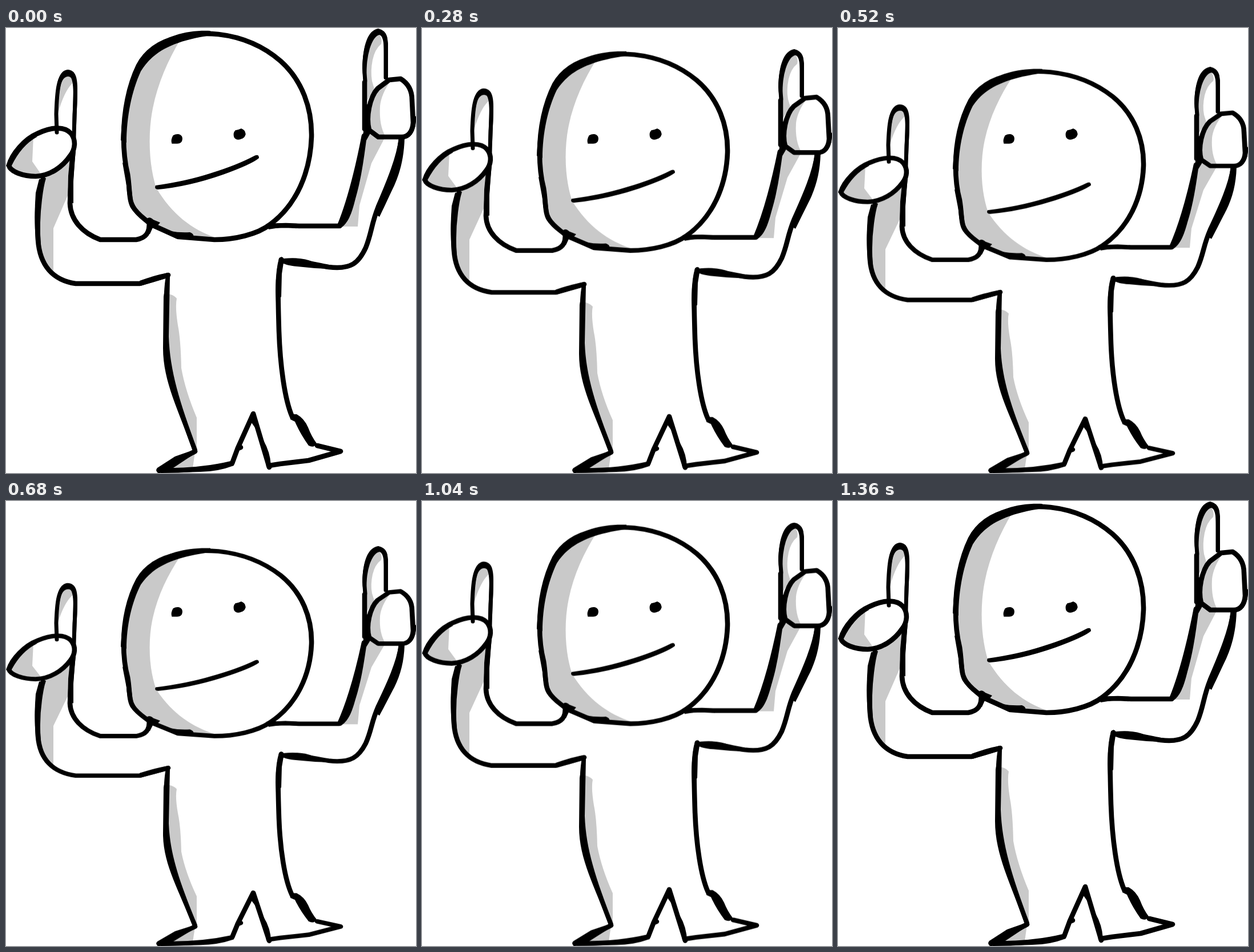
Animation of 718x780 px, one loop 1400 ms. Source, as an HTML page:

```html
<!DOCTYPE html>
<html lang="en">
<head>
<meta charset="utf-8">
<title>Squash bounce</title>
<style>
  html, body { margin: 0; width: 100%; height: 100%; overflow: hidden; background: #fff; }
  svg { display: block; width: 718px; height: 780px; }
  #figure { transform-origin: 0 780px; translate: 0 1px; }
  .shade { fill: #c9c9c9; }
  .line { fill: none; stroke: #000; stroke-width: 8.6; stroke-linecap: round; stroke-linejoin: round; }
  .thin { stroke-width: 7; }
  .paper { fill: #fff; }
  .eyes { stroke: #000; stroke-width: 1.5; }
</style>
</head>
<body>
<svg viewBox="0 0 718 780">
  <g id="figure">
    <!-- shading -->
    <g class="shade">
      <path d="M305 20C284 55 266 95 257 140C249 180 249 235 263 279C290 325 325 352 368 367L300 364L253 343C243 333 232 328 222 312C215 300 217 280 213 255C208 235 206 215 206 190C206 145 215 100 232 65C245 40 270 22 305 20Z"/>
      <path d="M66 262L114 222L111 286L83 350V428C64 412 58 390 56 370C53 330 53 290 66 262Z"/>
      <path d="M119 84L116 96Q102 110 91 148C89 110 94 85 108 80Z"/>
      <path d="M283 465Q293 466 299 473Q296 488 301 520Q306 545 307 595Q314 635 334 682V741L330 739C315 690 280 620 280 560Z"/>
      <path d="M331 742L290 769L327 771Z"/>
      <path d="M588 347H616L619 310L640 236L664 190L632 184L618 240Q608 300 588 347Z"/>
      <path d="M652 7Q660 18 657 27Q646 36 642 55Q638 75 641 92L645 106L630 130L627 50Q634 14 652 7Z"/>
    </g>

    <!-- body and legs -->
    <g class="line">
      <path class="thin" d="M284 432C279 455 280 480 280 560C283 610 305 670 331 741"/>
      <path d="M482 405C475 430 476 460 478 530C480 590 488 650 501 680"/>
      <path d="M268 775L331 741M272 774C310 775 355 772 396 762L406 735L433 675L461 769"/>
      <path d="M461 766L480 763L530 757L586 741L545 731"/>
      <path d="M406 736L411 734"/>
    </g>
    <path d="M282 432Q287 427 287 434L285 540C287 600 304 655 335 738Q332 745 327 740C303 670 275 620 275 560L276 470Z"/>
    <path d="M333 737Q340 743 326 748L293 770L350 771Q374 768 396 760L399 766Q370 777 340 777L272 779Q259 777 265 770L296 750Z"/>
    <path d="M428 688L437 683Q444 710 451 722Q464 745 464 770Q460 776 456 768Q451 735 440 705Z"/>
    <path d="M497 676L509 676Q522 683 529 699Q535 715 544 727Q540 736 530 731Q515 710 506 689L498 685Z"/>

    <!-- left arm -->
    <g class="line">
      <path d="M65 264C53 290 54 335 56 370C59 415 82 441 122 447L234 447L284 432"/>
      <path d="M118 208L114 262L112 306C113 335 133 358 165 370L228 370C245 367 251 358 251 342"/>
    </g>
    <path d="M58 264L70 262Q66 275 63 300Q58 340 61 380L52 370Q49 330 52 288Z"/>
    <path d="M114 205H123L120 235L118 265V306H108L109 258Z"/>
    <path d="M234 442Q262 432 283 428Q289 432 283 437L236 451Z"/>

    <!-- left hand -->
    <path class="paper" d="M4 240C12 210 52 175 92 174C118 178 126 198 114 219C96 248 48 270 4 240Z"/>
    <path class="shade" d="M48 189L46 233L64 259C35 262 10 252 5 240C8 220 30 196 48 189Z"/>
    <g class="line">
      <path d="M5 240C10 220 33 193 55 184C78 173 102 170 114 184C123 196 121 211 113 222C99 243 77 258 52 259C30 259 8 251 5 240Z"/>
      <path class="thin" d="M89 182L88 150C89 115 91 78 108 77C122 78 123 105 120 150L119 190"/>
    </g>
    <path d="M87 125C88 90 95 73 108 72C122 73 126 85 125 115L123 170L116 182L118 110Q119 84 109 84Q99 84 95 102Q92 115 91 145Z"/>
    <path d="M0 241Q14 202 52 184L54 190Q27 205 10 240Z"/>

    <!-- right arm -->
    <g class="line">
      <path d="M460 346L490 345L513 346H584C602 302 615 250 627 188"/>
      <path d="M484 408C515 405 540 414 565 418C605 423 618 410 630 384C641 356 639 345 652 312C672 266 688 226 692 194"/>
    </g>
    <path d="M456 342L490 341L515 345L513 350L485 348L460 352Z"/>
    <path d="M586 340C605 295 614 245 623 188L632 188C627 225 623 260 612 298C605 326 599 341 586 350Z"/>
    <path d="M487 403Q518 400 538 409L560 415L562 421Q535 420 510 417Q488 415 484 410Z"/>
    <path d="M688 190L698 192C697 225 691 250 680 275C668 300 660 318 654 330L648 326C660 285 682 245 688 190Z"/>
    <path d="M478 403Q483 397 487 404L483 430L482 470L473 480Q470 440 478 403Z"/>

    <!-- right hand -->
    <path class="paper" d="M640 181C630 160 635 115 656 99C676 86 700 85 709 112C716 140 715 170 706 185L690 190H654Z"/>
    <path class="shade" d="M674 91Q657 115 655 136Q653 170 665 190L650 188L637 176C631 154 636 118 648 105Z"/>
    <g class="line">
      <path d="M652 190L636 178C630 155 637 120 651 105L671 90L691 88C704 96 711 108 711 125L713 165C712 181 704 190 693 190Z"/>
      <path d="M628 94V176"/>
      <path class="thin" d="M629 92C625 55 630 12 652 5C664 6 665 18 665 25V86"/>
    </g>
    <path d="M624 70C625 30 633 3 652 0Q663 2 667 14L669 26V88H662V42Q662 13 654 11Q644 13 637 35Q631 55 631 85L626 92Z"/>
    <path d="M627 135L637 131Q634 160 640 180L631 196L624 198L626 180Q622 165 627 135Z"/>
    <path d="M709 150L718 154Q719 173 711 185Q705 194 693 194L692 187Q707 186 709 170Z"/>

    <!-- head -->
    <g class="line">
      <path d="M302 16C330 8 350 8 372 10C415 15 451 31 481 57C519 91 536 140 535 190C533 250 510 308 463 343C440 361 400 370 365 370L302 365L253 343C243 333 232 328 222 312C215 300 217 280 213 255C208 235 206 215 206 190C206 145 215 100 232 65C245 40 270 22 302 16Z"/>
    </g>
    <path d="M358 4C303 2 261 20 233 58C211 95 204 140 201 196L211 200C211 155 220 110 236 75C256 42 290 22 358 12Z"/>
    <path d="M204 235L213 238L218 265L222 302L231 320L222 319Q212 302 211 275Z"/>
    <path d="M246 334Q251 328 258 335L270 340L264 347Q290 359 322 357Q332 361 326 367L300 369L257 349L252 360L245 358Q248 345 246 334Z"/>
    <path d="M262 275Q318 267 360 253Q405 239 435 223Q443 219 443 227Q430 238 380 256Q320 277 266 282Q259 281 262 275Z"/>
  </g>

  <!-- the eyes stay put -->
  <g class="eyes">
    <path d="M293 189Q298 186 303 187Q309 189 308 196Q307 202 300 202H291Q289 196 293 189Z"/>
    <path d="M402 180Q408 179 412 177Q418 179 419 186Q417 193 411 194Q404 197 400 191Q398 184 402 180Z"/>
  </g>
</svg>
<script>
  const LOOP = 1400, LOW = 640, UP = 1360, STEP = 40;
  const pose = (time, scale, until = time) => ({
    offset: time / LOOP,
    transform: `scaleY(${scale})`,
    easing: `steps(${Math.max(1, (until - time) / STEP)}, end)`
  });
  document.getElementById('figure').animate(
    [pose(0, 1, LOW), pose(LOW, 0.894, UP), pose(UP, 1), pose(LOOP, 1)],
    { duration: LOOP, iterations: Infinity }
  );
</script>
</body>
</html>
```
